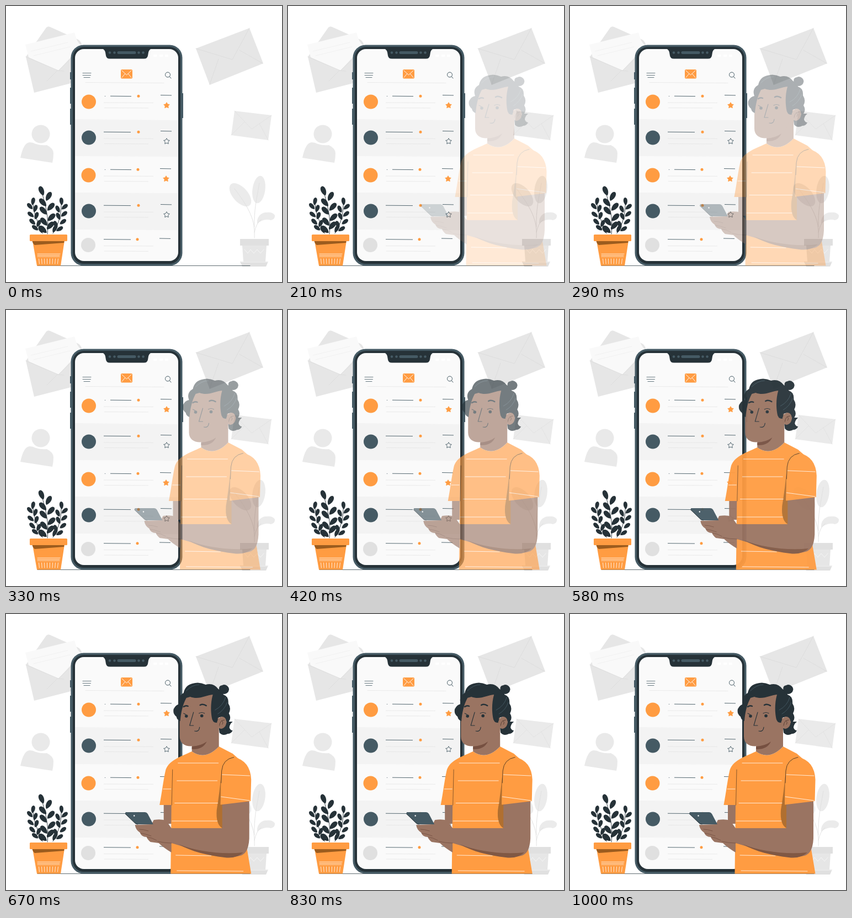
Write an HTML page that moves like this. It is 500 px wide and 500 px high and loops after 1.04 s.

```html
<!DOCTYPE html>
<html lang="en">
<head>
<meta charset="utf-8">
<title>Mail app</title>
<style>
html, body { margin: 0; width: 100%; height: 100%; overflow: hidden; background: #fff; }
svg { display: block; width: 100%; height: 100%; }
.line { fill: none; stroke-linecap: round; stroke-linejoin: round; }
</style>
</head>
<body>
<svg viewBox="0 0 500 500">
  <!-- pale backdrop -->
  <g fill="#e6e6e6">
    <path d="M36 92L73 39Q76 36 80 38L131 61Q137 65 137 71V135L51 157Z"/>
    <path fill="#f9f9f9" d="M35 70L124 48Q128 66 137 72L95 117L41 93Z"/>
    <path class="line" stroke="#dadada" stroke-width=".7" d="M36 92L95 117L118 95M74 136L93 117L105 118"/>
    <path class="line" stroke="#efefef" stroke-width=".8" d="M45 82L112 66M50 90L116 74"/>
    <path d="M344 77L441 40L466 104L369 143Z"/>
    <path class="line" stroke="#d9d9d9" stroke-width=".7" d="M344 77L410 97L441 40M369 142L385 96M465 104L423 80"/>
    <path fill="#eaeaea" d="M414 190L481 198L475 243L408 234Z"/>
    <path class="line" stroke="#dedede" stroke-width=".7" d="M414 190L445 223L481 198M408 234L432 210M475 243L459 213"/>
    <g fill="#e9e9e9">
      <circle cx="63" cy="232" r="16.5"/>
      <path d="M26 275Q32 247 43 247Q49 247 54 250Q64 253 74 252Q86 258 86 267Q86 276 84 284Z"/>
    </g>
    <g fill="#ebebeb">
      <ellipse cx="424.5" cy="342" rx="13.5" ry="25.5" transform="rotate(-42 424.5 342)"/>
      <ellipse cx="458" cy="332.500" rx="11.500" ry="25" transform="rotate(8 458 332.500)"/>
      <path d="M455 394C454 382 462 374 472 374Q483 373 487 379Q488 386 480 388C470 385 462 389 455 394Z"/>
    </g>
    <path class="line" stroke="#dfdfdf" stroke-width=".9" d="M450 420C451 395 448 375 414 331M450 400C449 370 454 350 459 321M450 410Q453 394 462 387"/>
    <path fill="#e0e0e0" d="M424 422H476V434H424ZM424 463H475L471 472H428Z"/>
    <path d="M428 434H472L470 463H430Z"/>
    <path class="line" stroke="#f7f7f7" stroke-width=".9" d="M432 441L438 448L443 441L449 448L455 441L461 448L467 441M426 464H474"/>
  </g>

  <path class="line" stroke="#37474f" stroke-width=".8" d="M57 470.500H442"/>

  <!-- potted plant -->
  <g id="leaves" fill="#263238"></g>
  <path class="line" stroke="#263238" stroke-width=".9" d="M75 413C79 385 70 355 65 338M66 412C60 395 48 375 49 353M85 412C96 395 101 375 100 353"/>
  <g fill="#ff9c42">
    <path d="M48 425H106L99 470.500H56Z"/>
    <path fill="#9c5c1e" d="M47.500 426H105.500L105 429L52 433Q49 431 47.500 426Z"/>
    <rect x="43" y="414" width="68" height="12" rx="1.500"/>
    <path class="line" stroke="#fff" stroke-width=".7" d="M57 449H98M57 451.500H97M57 454H97"/>
    <path id="ticks" class="line" stroke="#fff" stroke-width=".8"/>
  </g>

  <!-- handset -->
  <g fill="#455a64">
    <path d="M116 120h2v13h-2zM116 148h2v29h-2zM116 186h2v29h-2zM319 158h2v45h-2z"/>
    <rect x="117.500" y="70.500" width="202" height="400" rx="23"/>
    <rect x="121" y="74" width="195" height="393" rx="20" fill="#263238"/>
    <rect x="125" y="78" width="187" height="384" rx="16" fill="#fafafa"/>
    <path fill="#f3f3f3" d="M125 205L312 207V273L125 272ZM125 338L312 339V406L125 405Z"/>
    <path fill="#263238" d="M174 77Q179 79 180 84L181 90Q182 95.500 188 95.500H250Q256 95.500 257 90L258 84Q259 79 264 77Z"/>
    <rect x="201.500" y="82" width="34" height="5" rx="2.500"/>
    <circle cx="188" cy="84.500" r="2.300"/><circle cx="196.500" cy="84.500" r="2.300"/>
    <circle cx="240.500" cy="84.500" r="2.300"/><circle cx="248.500" cy="84.500" r="2.300"/>
    <path fill="#fff" d="M267 88h6v4h-6zM278 88h6v4h-6zM288 88h6v4h-6z"/>
    <path class="line" stroke="#455a64" stroke-width=".8" d="M139 121.500H154M139 125.500H153.500M141 129.500H152"/>
    <path class="line" stroke="#455a64" d="M296.500 128L299 131"/>
    <circle cx="293" cy="124.500" r="4.500" fill="none" stroke="#455a64"/>
    <path class="line" stroke="#e0e0e0" stroke-width=".6" d="M144 138.500L286 139.500"/>
    <rect x="208" y="115" width="21" height="16.500" rx="2" fill="#ff9c42"/>
    <path class="line" stroke="#fff" stroke-width=".9" d="M210 117L218.500 125L227 117M210 129.500L215.500 123M227 129.500L221.500 123"/>
  </g>
  <g id="rows"></g>

  <!-- man -->
  <g id="man">
    <g fill="#9a7462">
      <path d="M286 340H302V380H286Z"/>
      <path fill="#ff9c42" d="M337 249Q361 266 386 240L411 253L436 275V420L444.500 470.500H298.500L300 346H278.500C283 322 285 303 289 285C293 266 315 259 337 249Z"/>
      <path fill="#b06f30" d="M391 283Q387 325 382 355Q380 381 392 388H394V345H389Z"/>
      <path class="line" stroke="#7b5026" stroke-width=".9" d="M302 282L300.500 346"/>
      <path class="line" stroke="#fff" stroke-width=".8" d="M312 270H385M310 302H383M306 342.500H384M301 375H383M308 437L372 438M310 465L430 466M285 317H299"/>
      <path d="M392 344L441 338V398Q442 434 424 438Q400 445 330 424L300 415V432Q285 423 277 415L262 413Q256 408 255 404Q246 404 243 396Q235 391 234 382L264 381L268 373Q281 371 290 374L300 388H392Z"/>
      <path fill="#805844" d="M313 417C345 430 390 436 430 432Q417 444 396 441C365 437 337 431 313 417Z"/>
      <path class="line" stroke="#6d4a3b" stroke-width=".7" d="M242 390Q249 390 258 393M244 397Q252 398 263 402M256 404Q264 405 273 410M275 412Q287 415 300 415"/>
      <path fill="#ff9c42" d="M389 345.500L390 290Q392 262 413 259Q443 266 444.500 300L443.500 339Z"/>
      <path class="line" stroke="#5c4126" d="M390 306L391 284Q393 263 413 259.500"/>
      <path class="line" stroke="#fff" stroke-width=".8" d="M392 291L442 293M390 331L442 338"/>
      <path fill="#455a64" d="M217 359H252Q255 359 257 362L267 381H239Q235 381 232 377L216 362Z"/>
      <path class="line" stroke="#263238" d="M216.500 362L232 377Q235 381 239 381"/>
      <circle cx="232.500" cy="365.500" r="1.200" fill="#fff"/>

      <path d="M337 230V249Q361 266 386 240V195Z"/>
      <path fill="#765041" d="M337 240Q353 239 364 231Q357 246 337 245Z"/>
      <path d="M326 140C318 160 315 180 315 200V222C315 236 327 241 340 239C362 237 374 225 377 211L386 200V140Z"/>
      <path fill="#263238" d="M316 194Q310 192 309 186Q302 181 304 172Q308 164 315 163Q310 150 322 143Q325 129 338 126Q350 122 362 128Q376 124 385 136Q393 138 394 146Q404 149 403 162Q409 171 404 180Q409 188 404 195H411Q405 200 405 206Q407 211 411 211Q408 217 402 217Q393 222 387 215L386 207L400 196L392 186L384 188V197Q374 198 373 187C371 175 371 160 375 146C362 147 350 156 334 150L327 152C320 165 317 180 316 194Z"/>
      <path fill="#263238" d="M387 139Q384 130 392 129Q397 126 402 131Q406 135 403 141Q398 147 390 144Z"/>
      <ellipse cx="391" cy="197" rx="8.500" ry="11" transform="rotate(12 391 197)"/>
      <path class="line" stroke="#546e7a" stroke-width=".6" d="M327 139Q338 128 350 128M398 151Q394 166 379 174M401 160Q396 174 384 181"/>
      <path class="line" stroke="#4b352d" stroke-width=".8" d="M387 202Q388 192 396 192M391 193Q395 196 392 200"/>
      <g fill="#263238"><circle cx="327" cy="185" r="2.800"/><circle cx="355" cy="184.500" r="2.800"/></g>
      <path class="line" stroke="#263238" stroke-width="2.500" d="M322 168Q326 165 330 167M352 165Q357 162 363 166"/>
      <path class="line" stroke="#263238" stroke-width="1.100" d="M340 178L333 202H340M342 212Q350 214 351 205M322 180L326 182M350 180Q355 177 360 180"/>
    </g>
  </g>
</svg>
<script>
const byId = id => document.getElementById(id);
const ORANGE = '#ff9c42', SLATE = '#455a64';

// x, y, angle; half-length
const sprigs = [
  [9, [[64.5,335,-22],[77,345,28],[67,356,-42],[81,364,42],[68,371,-42],[82,383,46],[69,391,-40],[80,398,42],[67,405,-48]]],
  [7, [[49,354,10],[43.5,363,-42],[53,367,20],[45,378,-50],[55,380,20],[48,391,-46],[59,394,25],[53,402,-52],[63,405,-25]]],
  [7, [[100.500,354,-5],[106,364,50],[94,368,-25],[105,377,50],[95,381,-25],[103,391,52],[90,396,-22],[97,404,58],[88,404,25]]]
];
byId('leaves').innerHTML = sprigs.map(([h, list]) => list.map(([x, y, a]) =>
  `<path transform="translate(${x} ${y}) rotate(${a})" d="M0 ${h}C${-h * .75} ${h / 3} ${-h * .6} ${-h} 0 ${-h}S${h * .75} ${h / 3} 0 ${h}Z"/>`
).join('')).join('');

byId('ticks').setAttribute('d', Array.from({length: 8}, (_, i) => `M${59.5 + i * 5} 458L${60.5 + i * 4.700} 467`).join(''));

function star(x, y, filled) {
  const pts = Array.from({length: 10}, (_, i) => {
    const a = i * Math.PI / 5, r = i % 2 ? 2.9 : 5.5;
    return `${x + r * Math.sin(a)},${y - r * Math.cos(a)}`;
  });
  return `<polygon points="${pts.join(' ')}" stroke-linejoin="round" stroke-width=".9" ` +
    (filled ? `fill="${ORANGE}" stroke="${ORANGE}"/>` : `fill="none" stroke="${SLATE}"/>`);
}
const rule = (x1, x2, y, color, w) => `<path d="M${x1} ${y}L${x2} ${y + .4}" stroke="${color}" stroke-width="${w}"/>`;

// avatar y, shift, avatar colour, star (1 filled, 0 outline)
const mails = [[173.500, 0, ORANGE, 1], [238.500, 0, SLATE, 0], [306.500, -1, ORANGE, 1], [371.500, 0, SLATE, 0], [433, -2, '#e0e0e0']];
byId('rows').innerHTML = mails.map(([y, s, color, mark], i) => {
  const top = y - 10.300;
  const title = mark ? rule(179, 180, top, SLATE, 1) + rule(189, 227, top, SLATE, .9) : rule(177, 226, top, SLATE, .9);
  return `<circle cx="${150 + s / 2}" cy="${y}" r="13" fill="${color}"/>` + title +
    rule(177, 267, y + 1.5, '#e2e2e2', .7) + rule(178, 258, y + 11, '#e2e2e2', .7) +
    `<circle cx="${240 + s}" cy="${top}" r="2.500" fill="${ORANGE}"/>` +
    rule(280 + s, 300 + s, y - 12, SLATE, .9) +
    (i < 4 ? star(291 + s, y + 6.700, mark) : '');
}).join('');

// step, horizontal offset, opacity
const keys = [[1, 31, 0], [2, 30.500, .03], [5, 24, .21], [8, 16.500, .47], [12, 6, .8], [14, 2.300, .95],
  [15, .9, 1], [16, -.3, 1], [18, -1.400, 1], [20, -1.800, 1], [22, -1.200, 1], [24, 0, 1]];
const man = byId('man'), LOOP = 1040, FPS = 24;

function draw(now) {
  const t = now % LOOP;
  const step = Math.min(24, Math.max(1, Math.floor((t + 5) * FPS / 1000)));
  const i = Math.max(1, keys.findIndex(k => k[0] >= step));
  const [a, b] = [keys[i - 1], keys[i]];
  const u = (step - a[0]) / (b[0] - a[0]);
  const mix = k => a[k] + (b[k] - a[k]) * u;
  man.setAttribute('transform', `translate(${mix(1)} 0)`);
  man.setAttribute('opacity', mix(2));
}
const start = performance.now();
function tick() {
  draw(performance.now() - start);
  requestAnimationFrame(tick);
}
tick();
</script>
</body>
</html>
```
